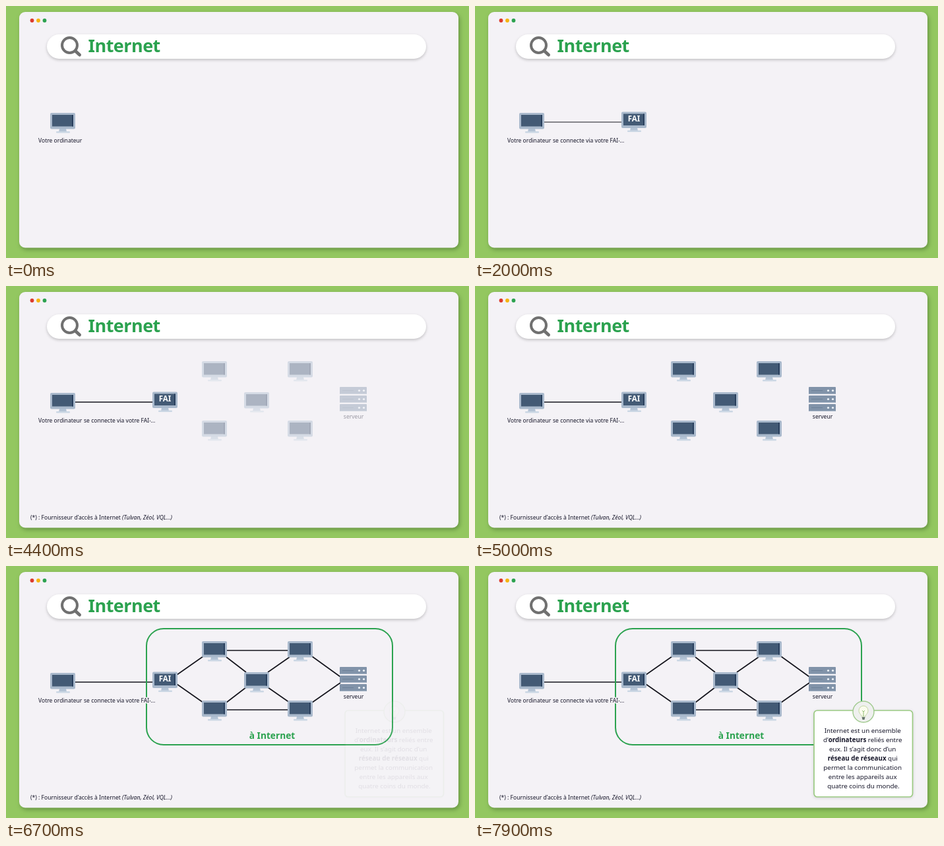
These frames come from a looping animation (702 by 382 pixels, 8000 ms). An HTML page:

```html
<!DOCTYPE html>
<html lang="fr">
<head>
<meta charset="utf-8">
<title>Internet</title>
<style>
  html, body { margin: 0; width: 100%; height: 100%; overflow: hidden; background: #93c760; }
  svg { display: block; width: 702px; height: 382px; }
  text { font: 8.55px "Noto Sans", "Open Sans", sans-serif; fill: #17172a; }
  .bold, .bold text { font-weight: 700; }
  .halo { paint-order: stroke; stroke: #f4f2f6; stroke-width: 3px; stroke-linejoin: round; }
  .link { fill: none; stroke: #15151d; stroke-width: 1.7; }
  .mid { text-anchor: middle; }
  #window { filter: drop-shadow(2px 3px 3px #4a732f99); }
  #search { filter: drop-shadow(0 2px 2px #0003); }
  #card { filter: drop-shadow(0 1px 2px #0002); }
  #title { font-size: 27px; letter-spacing: -.02em; fill: #2ba24f; }
  #zone { font-size: 13.7px; fill: #2ba24f; }
  #note text { font-size: 9.8px; }
</style>
</head>
<body>
<svg viewBox="0 0 702 382">
  <defs>
    <g id="pc">
      <path d="M14 24h10l1 5H13z" fill="#b3c3d5"/>
      <rect x="9" y="28" width="21" height="2.5" rx="1" fill="#cbd7e4"/>
      <rect width="38" height="24.5" rx="2" fill="#a9b9cc"/>
      <rect x="3" y="3" width="32" height="17.5" fill="#435a75"/>
      <path d="M33 3h2v17.500h-2z" fill="#293f5d"/>
    </g>
    <g id="unit">
      <rect width="41" height="11" rx="1" fill="#8193a9"/>
      <path d="M1 10.500h39" stroke="#a6b5c6"/>
      <path d="M4 5.500h17" stroke="#6d8198"/>
      <circle cx="29.500" cy="5.500" r="1.600" fill="#edf2f7"/>
      <circle cx="36.500" cy="5.500" r="1.600" fill="#edf2f7"/>
    </g>
  </defs>

  <rect id="window" x="20" y="9" width="666" height="357.500" rx="9" fill="#f4f2f6"/>
  <circle cx="39.500" cy="22" r="2.900" fill="#dc3a2c"/>
  <circle cx="49" cy="22" r="2.900" fill="#f6b40e"/>
  <circle cx="58.500" cy="22" r="2.900" fill="#2ba24f"/>

  <rect id="search" x="62" y="43" width="575" height="37" rx="18.500" fill="#fff"/>
  <g fill="none" stroke="#707070">
    <circle cx="96.500" cy="59.500" r="11.500" stroke-width="4"/>
    <path d="M105 68l6.500 6" stroke-width="5" stroke-linecap="round"/>
  </g>
  <text id="title" class="bold" x="124.500" y="70">Internet</text>

  <path class="link" data-start="1500" d="M104 176H223"/>

  <g data-start="5050">
    <path class="link" d="M259 165L299 137M259 179L299 207M334 128H428M334 218H428
      M334 138L364 161M334 207L364 184M397 161L430 138M397 184L430 207
      M464 137L507 168M464 207L507 177"/>
  </g>
  <g data-start="5150">
    <rect x="213" y="95" width="373" height="176" rx="26" fill="none" stroke="#2ba24f" stroke-width="2"/>
    <text id="zone" class="bold mid" x="403.500" y="262">à Internet</text>
  </g>

  <use href="#pc" x="67" y="162"/>
  <text class="halo" x="49" y="207">Votre ordinateur</text>
  <g data-start="550">
    <use href="#pc" x="222" y="160.500"/>
    <text class="bold mid" x="241" y="175.300" style="font-size:11.500px;fill:#fff">FAI</text>
    <text class="halo" x="118" y="207">se connecte via votre FAI<tspan font-size="6">•</tspan>...</text>
  </g>
  <text data-start="2000" x="37" y="354">(*) : Fournisseur d’accès à Internet <tspan font-style="italic">(Tulvan, Zéol, VQL…)</tspan></text>

  <g data-start="4100">
    <use href="#pc" x="297" y="114"/>
    <use href="#pc" x="427" y="114"/>
    <use href="#pc" x="361" y="161"/>
    <use href="#pc" x="297" y="204"/>
    <use href="#pc" x="427" y="204"/>
    <use href="#unit" x="506" y="153"/>
    <use href="#unit" x="506" y="166"/>
    <use href="#unit" x="506" y="179"/>
    <text class="mid" x="527" y="201">serveur</text>
  </g>

  <g id="note" data-start="6640">
    <rect id="card" x="514" y="219" width="149.500" height="131" rx="5" fill="#fff" stroke="#9bca82" stroke-width="1.700"/>
    <circle cx="589" cy="221" r="16" fill="#eff0ef" stroke="#a3cb92" stroke-width="1.500"/>
    <path d="M586 228c0-3-4-4-4-9a7 7 0 0 1 14 0c0 5-4 6-4 9z" fill="#fbfcee" stroke="#c3d7a5"/>
    <path d="M589 228v-7l-2-2m2 2l2-2" fill="none" stroke="#8fbd70"/>
    <path d="M586.500 229h5l-1 4h-3z" fill="#68766c"/>
    <text class="mid" y="252.500">
      <tspan x="589">Internet est un ensemble</tspan>
      <tspan x="589" dy="14">d’<tspan class="bold">ordinateurs</tspan> reliés entre</tspan>
      <tspan x="589" dy="14">eux. Il s’agit donc d’un</tspan>
      <tspan x="589" dy="14"><tspan class="bold">réseau de réseaux</tspan> qui</tspan>
      <tspan x="589" dy="14">permet la communication</tspan>
      <tspan x="589" dy="14">entre les appareils aux</tspan>
      <tspan x="589" dy="14">quatre coins du monde.</tspan>
    </text>
  </g>
</svg>
<script>
  const LOOP = 8000, FADE = 750;
  const parts = [...document.querySelectorAll("[data-start]")];
  const origin = performance.now();

  function draw() {
    const time = (performance.now() - origin) % LOOP;
    for (const part of parts) {
      const progress = (time - part.dataset.start) / FADE;
      part.style.opacity = Math.min(1, Math.max(0, progress));
    }
    requestAnimationFrame(draw);
  }
  draw();
</script>
</body>
</html>
```
